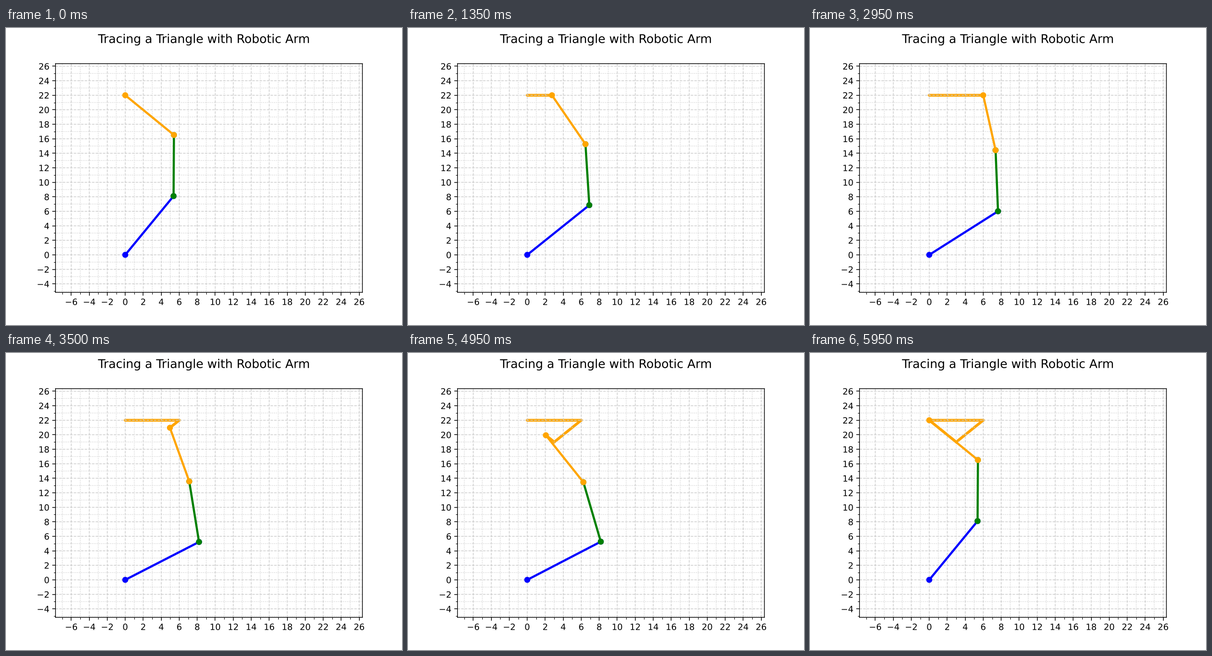
Recreate the animation shown at these times as a matplotlib script. Size 864 by 648 pixels, loop 6000 ms.

```python
import numpy as np
import matplotlib.pyplot as plt
from matplotlib.animation import FuncAnimation
from matplotlib.patheffects import Normal
from matplotlib.ticker import MultipleLocator

L1, L2, L3 = 9.72, 8.42, 7.70
REACH = L1 + L2 + L3
COLORS = ("blue", "green", "orange")
SMOOTH = [Normal()]  # draws text and markers as paths, at subpixel positions

plt.rcParams["text.hinting"] = "none"


def leg(start, end, n):
    return np.linspace(start, end, n)


def solve(tip):
    """Joint positions of the three-link arm for a tip position."""
    x, y = tip
    phi = 2.35 - 0.1 * x  # tool angle follows the tip's x
    wx, wy = x - L3 * np.cos(phi), y - L3 * np.sin(phi)
    c2 = (wx**2 + wy**2 - L1**2 - L2**2) / (2 * L1 * L2)
    q2 = np.arccos(np.clip(c2, -1, 1))
    q1 = np.arctan2(wy, wx) - np.arctan2(L2 * np.sin(q2), L1 + L2 * np.cos(q2))
    elbow = (L1 * np.cos(q1), L1 * np.sin(q1))
    return np.array([(0, 0), elbow, (wx, wy), (x, y)])


path = np.vstack([
    leg((0, 22), (6, 22), 60),
    leg((6, 22), (3, 19), 30),
    leg((3, 19), (0, 22), 30),
])

fig, ax = plt.subplots(figsize=(6.4, 4.8), dpi=135)
fig.suptitle("Tracing a Triangle with Robotic Arm", fontsize=14,
             path_effects=SMOOTH)
ax.set_xlim(-0.3 * REACH, 1.02 * REACH)
ax.set_ylim(-0.2 * REACH, 1.02 * REACH)
for axis in (ax.xaxis, ax.yaxis):
    axis.set_major_locator(MultipleLocator(2))
    axis.set_minor_locator(MultipleLocator(1))
ax.grid(which="major", color="#CCCCCC", linestyle="--")
ax.grid(which="minor", color="#CCCCCC", linestyle=":")

for spine in ax.spines.values():
    spine.set_snap(False)
for axis in (ax.xaxis, ax.yaxis):
    for tick in [*axis.get_major_ticks(), *axis.get_minor_ticks()]:
        tick.gridline.set_snap(False)
        tick.label1.set_path_effects(SMOOTH)

# The trace lies below the grid, the arm above it.
trace = ax.scatter([], [], s=5, color="orange", zorder=1, path_effects=SMOOTH)
links = [ax.plot([], [], "o-", color=c, lw=2.5, path_effects=SMOOTH)[0]
         for c in COLORS]


def update(i):
    joints = solve(path[i])
    for k, link in enumerate(links):
        link.set_data(joints[k:k + 2, 0], joints[k:k + 2, 1])
    trace.set_offsets(path[:i + 1])
    return [trace, *links]


anim = FuncAnimation(fig, update, frames=len(path), interval=50,
                     repeat=True, repeat_delay=0, blit=False)
plt.show()
```
